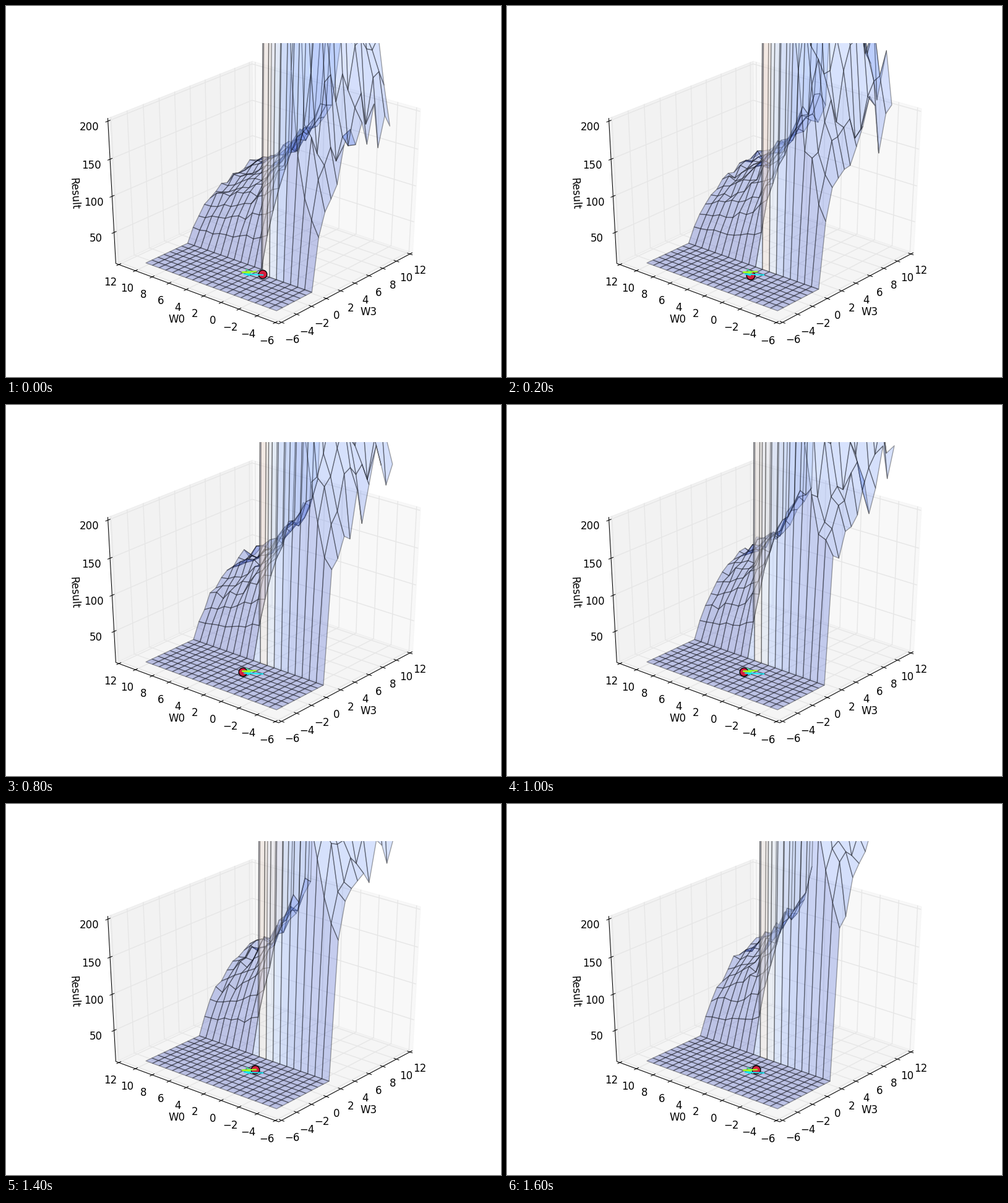
Recreate the animation shown at these times as a matplotlib script. Size 800x600 px, loop 1.8 s.

```python
import numpy as np
import matplotlib.pyplot as plt
from matplotlib.animation import FuncAnimation
from matplotlib.collections import LineCollection, PolyCollection
from matplotlib.patches import Circle, Rectangle

plt.rcParams["font.family"] = "DejaVu Sans"

W, H, DPI = 800, 600, 100
LOW, HIGH = -6, 12            # limits of W0 and W3
ZLOW, ZHIGH = 10, 200
ELEV, AZIM, DIST = np.radians(30), np.radians(-140), 10
N = 20
GRID = np.linspace(-5, 10, N)
GAP = GRID[1] - GRID[0]
ROW, COL = np.meshgrid(np.arange(N), np.arange(N), indexing="ij")

PHASES = [0, 1, 1, 2, 3, 3.5, 4, 4.5, 5]     # 200 ms each
BALL = [(415, 434), (394, 436), (383, 432), (403, 430)]


def unit(v):
    return (v - LOW) / (HIGH - LOW) - .5


def zunit(v):
    return (v - ZLOW) / (ZHIGH - ZLOW) - .5


def project(x, y, z):
    """Unit-cube coordinates to stage pixels and distance."""
    right = -np.sin(AZIM) * x + np.cos(AZIM) * y
    ahead = -np.cos(AZIM) * x - np.sin(AZIM) * y
    depth = DIST + ahead * np.cos(ELEV) - z * np.sin(ELEV)
    up = z * np.cos(ELEV) + ahead * np.sin(ELEV)
    px = 100 + 620 * (right / depth + .095) / .185
    py = 540 - 480 * (up / depth + .095) / .185
    return px, py, depth


def path(*pts):
    return [project(*p)[:2] for p in pts]


def heights(p):
    """Flat floor, a steep wall in front of the ridge, a bowl behind it."""
    rng = np.random.default_rng(40 + int(2 * p))
    front = round(6 + .6 * p)
    back = max(7, round(6 + .65 * p))
    ridge = round(7.4 + .6 * p)
    near = COL <= ridge
    k = np.maximum(ROW - np.where(near, front, back), 0)
    u = GAP * np.abs(COL - ridge + .3)

    s = .4 * k + .1 + (.1 + .08 * p) * u
    wall = (2100 + 300 * p) * s / (s**2 + u**2) * (1 + .002 * p**2 * k)
    wall /= np.sqrt(1 + (wall / 1600)**2)
    bowl = (85 + 2 * p) * (1 - np.exp(-k / 4)) * 14 / (u + 5)

    rough = np.where(near, (.16 - .018 * p) * (.3 + .7 * ROW / N), .05)
    bump = 1 + rough * np.clip(rng.normal(size=k.shape), -2, 2)
    return ZLOW + np.where(k > 0, np.where(near, wall, bowl) * bump, 0)


def corners(a):
    return np.stack([a[:-1, :-1], a[1:, :-1], a[1:, 1:], a[:-1, 1:]], -1).reshape(-1, 4)


def mesh(p):
    z = heights(p)
    px, py, depth = project(unit(GRID)[:, None], unit(GRID)[None, :], zunit(z))
    order = np.argsort(-corners(depth).mean(1))
    verts = np.stack([corners(px), corners(py)], -1)[order]
    level = corners(z).mean(1)[order]
    faces = plt.cm.coolwarm((level - level.min()) / np.ptp(level))
    faces[:, 3] = .3
    return verts, faces


fig = plt.figure(figsize=(W / DPI, H / DPI), dpi=DPI, facecolor="white")
ax = fig.add_axes([0, 0, 1, 1])
ax.set_xlim(0, W)
ax.set_ylim(H, 0)
ax.axis("off")


def lines(segs, color, width, z):
    ax.add_collection(LineCollection(segs, colors=color, linewidths=width, zorder=z),
                      autolim=False)


def label(x, y, s, **kw):
    ax.text(x, y, s, fontsize=12, ha="center", zorder=6, **{"va": "baseline", **kw})


def tick_label(point, v):
    x, y, _ = project(*point)
    label(x, y + 13.7, str(v).replace("-", "\u2212"))


# panes reach a little past the limits
lo, hi = -.5 - 1 / 48, .5 + 1 / 48
panes = [
    (path((lo, hi, lo), (hi, hi, lo), (hi, hi, hi), (lo, hi, hi)), .90),
    (path((hi, lo, lo), (hi, hi, lo), (hi, hi, hi), (hi, lo, hi)), .95),
    (path((lo, lo, lo), (hi, lo, lo), (hi, hi, lo), (lo, hi, lo)), .925),
]
for pts, grey in panes:
    shade = (grey, grey, grey, .5)
    ax.add_collection(PolyCollection([pts], facecolors=[shade], edgecolors=[shade],
                                     linewidths=1, zorder=1), autolim=False)

# grid, ticks and tick labels
half = 1 / 60
away = 1 / 16
grid, marks = [], []
for v in range(LOW, HIGH + 1, 2):
    t = unit(v)
    grid += [path((t, lo, lo), (t, hi, lo), (t, hi, hi)),
             path((lo, t, lo), (hi, t, lo), (hi, t, hi))]
    marks += [path((lo - half, t, lo), (lo + half, t, lo)),
              path((t, lo - half, lo), (t, lo + half, lo))]
    tick_label((lo - away, t, lo - away), v)
    tick_label((t, lo - away, lo - away), v)
for v in range(50, 201, 50):
    t = zunit(v)
    grid.append(path((lo, hi, t), (hi, hi, t), (hi, lo, t)))
    marks.append(path((lo - half, hi, t), (lo + half, hi, t)))
    tick_label((lo - away, hi + away, t), v)
axes = [path((lo, hi, hi), (lo, hi, lo)),
        path((lo, hi, lo), (lo, lo, lo)),
        path((lo, lo, lo), (hi, lo, lo))]
lines(grid, "#e6e6e6", 1, 2)
lines(axes + marks, "black", .75, 3)

label(276, 512, "W0")
label(586, 500, "W3")
label(110, 303, "Result", rotation=-86.8, va="center")

surf = PolyCollection([], edgecolors=[(0, 0, 0, .35)], linewidths=1,
                      joinstyle="round", zorder=4)
ax.add_collection(surf, autolim=False)
surf.set_clip_path(Rectangle((100, 60), 620, 480, transform=ax.transData))

ball = Circle(BALL[0], 6.8, fc="#d4203f", ec="black", lw=1, zorder=5)
ax.add_patch(ball)

# moves made by the ball
lines([[(416, 435), (384, 433.5)], [(394, 432), (387, 433.6), (394, 436)]],
      "#10e8f0", 1.4, 5.1)
lines([[(396, 432), (383, 430.5)], [(395, 430), (388, 426)]], "#40f0a0", 1.2, 5.2)
lines([[(381, 430.5), (405, 429.5)], [(382, 430.5), (394, 431.5)]],
      "#a0ff20", 1.6, 5.3)


def update(i):
    p = PHASES[i]
    verts, faces = mesh(p)
    surf.set_verts(verts)
    surf.set_facecolor(faces)
    ball.center = BALL[int((p + 1.5) // 2)]
    return surf, ball


anim = FuncAnimation(fig, update, frames=len(PHASES), interval=200,
                     repeat=True, repeat_delay=0)
plt.show()
```
